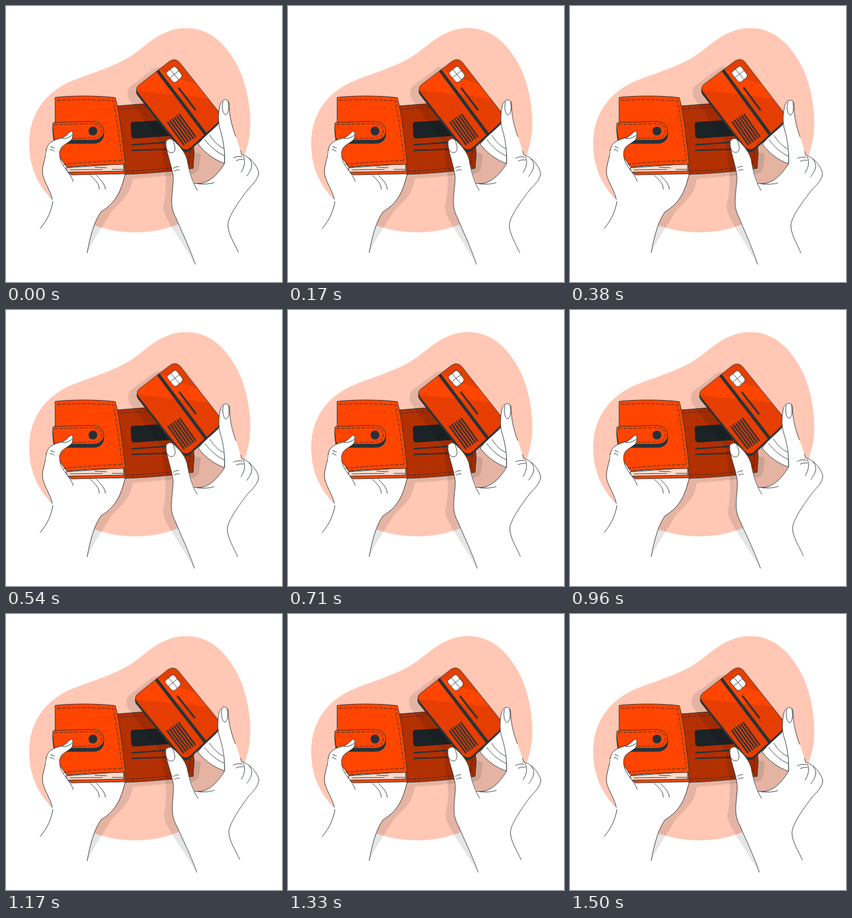
Animation, 500 px wide and 500 px high, one loop 1540 ms. Source, as an HTML page:

```html
<!DOCTYPE html>
<html lang="en">
<head>
<meta charset="utf-8">
<title>Wallet and card</title>
<style>
  html, body { margin: 0; width: 100%; height: 100%; overflow: hidden; background: #fff; }
  svg { display: block; width: 100vw; height: 100vh; }
  .ink { fill: none; stroke: #263238; stroke-linecap: round; stroke-linejoin: round; }
  .edge { stroke: #263238; stroke-linejoin: round; }
  .stitch { fill: none; stroke: #263238; stroke-dasharray: 6 3; }
  .shade { fill: #000; opacity: .1; }
  .dark { fill: #263238; }
  .red { fill: #ff4500; }
  .skin { fill: #fff; }
  .sway { transform-origin: 338px 282px; animation: sway 1540ms linear infinite; }
  @keyframes sway {
    0%, 100% { transform: rotate(.04deg); }
    23.2% { transform: rotate(1deg); }
    72.2% { transform: rotate(-1deg); }
  }
</style>
</head>
<body>
<svg viewBox="0 0 500 500">
  <defs>
    <path id="card" d="M241 143L295 101C302 96 309 96 315 103L384 190C389 198 388 206 383 212L334 257C328 262 321 261 316 255L239 158C235 152 236 147 241 143Z"/>
    <clipPath id="inCard"><use href="#card"/></clipPath>
    <path id="strap" d="M88 211L155 209C170 209 178 218 177 229C175 239 167 243 157 243L88 243C86 235 84 222 85 213Q85 211 88 211Z"/>
    <path id="bar" d="M293 211L322 251"/>
  </defs>

  <path fill="#ffc7b4" d="M42 250C42 200 66 162 112 139C152 121 204 110 240 81C268 58 292 40 327 40C372 40 404 74 424 118C440 155 446 205 441 236C432 290 400 350 345 380C305 402 270 410 235 410C190 410 150 397 118 378C68 348 42 302 42 250Z"/>
  <path class="shade" d="M216 300L341 265L353 268L350 292Q348 301 338 304L230 313C226 331 222 340 213 350C198 366 190 372 188 378C176 397 160 420 148 446C153 415 160 390 172 373C198 358 206 340 216 305Z"/>

  <!-- wallet inside -->
  <path class="edge" fill="#b33000" d="M201 181L253 177L330 180L341 265L339 294Q280 303 216 305Z"/>
  <path class="stitch" d="M205 187Q235 184 268 183M334 262L331 289Q270 298 217 299"/>
  <path fill="#1b2327" d="M231 210L280 207L303 235L234 240Q227 240 227 235L226 215Q226 210 231 210Z"/>
  <path class="ink" stroke-width="2.400" d="M228 251.500L290 247M228 261.500L290 259.500"/>

  <!-- left hand -->
  <path class="skin" d="M62 403C76 386 82 372 85 354C79 330 66 315 66 300C66 287 73 272 73 260C75 250 82 245 100 240L122 270L216 300C208 338 198 357 172 373C160 390 153 415 147 447Z"/>
  <path class="ink" d="M62 403C76 386 82 372 85 354M84 350C79 330 66 315 66 300C66 287 73 272 73 260M216 304C208 338 198 357 172 373C160 390 153 415 147 447M153 307C163 316 169 323 169 332M164 307C174 317 179 323 180 332"/>

  <!-- wallet front -->
  <path class="red edge" d="M100 290L111 301L216 298L216 304L118 306Z"/>
  <path class="edge" fill="#ffdacc" d="M109 293L213 286L213 299L111 301Z"/>
  <path class="ink" d="M116 297L175 296M161 292L182 293M192 296L212 296"/>
  <path class="red edge" d="M89 165.500C120 162 165 162 198 166C205 188 212 250 216 287Q160 287 110 292L98 275L89 240Z"/>
  <path class="stitch" d="M93 171Q144 168 194 172C201 202 206 248 211 280M104 287Q160 281 212 280"/>
  <use href="#strap" class="dark edge" y="6"/>
  <use href="#strap" class="red edge"/>
  <path class="stitch" d="M88 215L154 213C166 213 173 218 173 227C172 236 165 239 155 239L120 240"/>
  <circle class="dark" cx="157.500" cy="226.500" r="8"/>

  <!-- left thumb -->
  <path class="skin" d="M73 262C74 247 88 242 101 239C110 236 114 228 118 227C122 226 122 235 119 242C113 248 104 251 100 257C96 264 97 270 98 276C102 293 116 301 122 318L95 335L70 300Z"/>
  <path class="ink" d="M73 262C74 247 88 242 101 239C110 236 114 228 118 227C122 226 122 235 119 242C113 248 104 251 100 257C96 264 97 270 98 276C102 293 116 301 122 318M101 240Q112 241 120 234M81 255Q86 255 88 258M80 260Q84 260 87 263"/>

  <g class="sway">
    <path class="shade" d="M226 145L270 112L300 110L360 260L396 285C386 304 370 320 347 322L335 315L305 300L301 345L300 362L343 468L298 397C291 383 285 375 285 362C291 338 291 310 286 285L282 250L222 168Q217 152 226 145Z"/>

    <!-- fingers behind the card -->
    <path class="skin edge" d="M384 207L396 240V285C378 279 361 267 348 250Z"/>
    <path class="ink" d="M369 234C377 246 384 253 394 258M360 242C371 256 382 265 395 271"/>

    <!-- card -->
    <use href="#card" class="dark edge" x="-.5" y="4"/>
    <use href="#card" class="red"/>
    <g clip-path="url(#inCard)">
      <path class="shade" d="M230 153L338 164L400 172V280H230ZM270 112L306 130L400 158V90H270Z"/>
      <path class="ink" stroke-width="5.500" d="M272 114L366 238"/>
    </g>
    <use href="#card" class="ink"/>
    <path class="skin edge" d="M292 119L302 111Q305 108 308 111L318 124Q320 127 317 130L308 138Q305 140 302 137L291 124Q289 121 292 119Z"/>
    <path class="ink" d="M297 115L313 134M297 130L313 117"/>
    <path class="ink" stroke-width="3.200" d="M313 149L343 188"/>
    <g class="ink" stroke-width="2.800">
      <use href="#bar"/>
      <use href="#bar" x="4.200" y="-2.900"/>
      <use href="#bar" x="8.400" y="-5.800"/>
      <use href="#bar" x="12.600" y="-8.700"/>
      <use href="#bar" x="16.800" y="-11.600"/>
      <use href="#bar" x="21" y="-14.500"/>
    </g>

    <!-- right hand -->
    <path class="skin" d="M343 468C332 436 318 408 308 384C296 362 301 348 303 315C304 300 292 270 289 250C289 242 296 239 302 242C314 253 324 264 328 278C332 298 337 310 341 321C364 325 381 309 396 285C397 262 393 240 388 224C383 210 385 188 388 178C392 168 401 167 404 175C404 202 411 222 417 238L427 269C442 272 456 290 458 303C455 318 443 326 437 334C423 353 403 380 402 396C402 412 414 430 421 446Z"/>
    <path class="ink" d="M343 468C332 436 318 408 308 384C296 362 301 348 303 315C304 300 292 270 289 250C289 242 296 239 302 242C314 253 324 264 328 278C332 302 339 322 347 334M341 321C364 325 381 309 396 285C397 262 393 240 388 224C383 210 385 188 388 178C392 168 401 167 404 175C404 202 411 222 416 236M425 262L427 269C442 272 456 290 458 303C455 318 443 326 437 334C423 353 403 380 402 396C402 412 414 430 421 446M347 322Q363 324 377 320"/>
    <path class="ink" d="M290 248C288 258 293 266 300 266C308 265 308 256 302 243M303 294Q308 290 313 291M305 299Q309 296 314 297M393 173C390 184 393 196 398 197C404 194 404 182 402 172M412 275Q420 271 428 273M417 280Q423 277 430 278M430 272C435 282 431 293 426 301M440 276C450 286 444 298 436 308"/>
  </g>
</svg>
</body>
</html>
```
